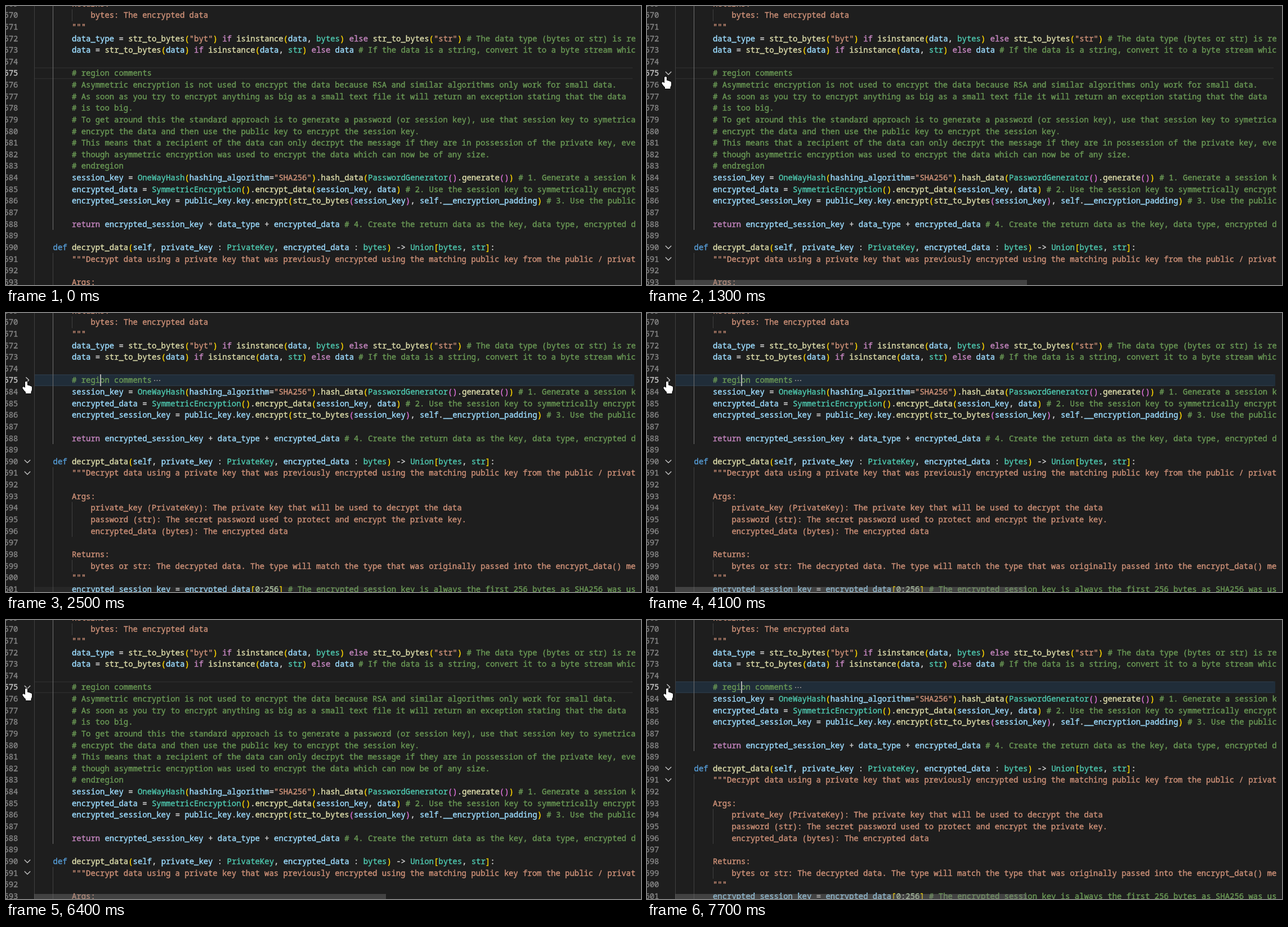
Recreate the animation shown at these times as an HTML page with a canvas. Size 1128 by 496 pixels, loop 8 s.

```html
<!DOCTYPE html>
<html lang="en">
<head>
<meta charset="utf-8">
<title>Folding a region</title>
<style>
html, body { margin: 0; width: 100%; height: 100%; overflow: hidden; background: #1e1e1e; }
canvas { display: block; width: 1128px; height: 496px; }
</style>
</head>
<body>
<canvas id="stage" width="1128" height="496"></canvas>
<script>
const ctx = document.getElementById('stage').getContext('2d');
const W = 1128, H = 496, LOOP = 8000;
const CHAR = 8.35, ROW = 20.63, LEFT = 50.2, MID = 16.2, CLIP = 1118;
const FIRST = 569, FOLD = 575, FOLD_END = 583;
const FONT = '13.917px "Noto Sans Mono", "DejaVu Sans Mono", monospace';
const C = {
  bg: '#1e1e1e', number: '#858585', active: '#c6c6c6', comment: '#6a9955', string: '#ce9178',
  name: '#9cdcfe', call: '#dcdcaa', type: '#4ec9b0', flow: '#c586c0', def: '#569cd6',
  digit: '#b5cea8', plain: '#d4d4d4', guide: '#404040', guideOn: '#707070'
};
const BRACKETS = ['#ffd700', '#da70d6', '#179fff'];

// A leading ~ marks docstring text.
const SOURCE = `~        Returns:
~            bytes: The encrypted data
~        """
        data_type = str_to_bytes("byt") if isinstance(data, bytes) else str_to_bytes("str") # The data type (bytes or str) is re
        data = str_to_bytes(data) if isinstance(data, str) else data # If the data is a string, convert it to a byte stream whic

        # region comments
        # Asymmetric encryption is not used to encrypt the data because RSA and similar algorithms only work for small data.
        # As soon as you try to encrypt anything as big as a small text file it will return an exception stating that the data
        # is too big.
        # To get around this the standard approach is to generate a password (or session key), use that session key to symetrica
        # encrypt the data and then use the public key to encrypt the session key.
        # This means that a recipient of the data can only decrpyt the message if they are in possession of the private key, eve
        # though asymmetric encryption was used to encrypt the data which can now be of any size.
        # endregion
        session_key = OneWayHash(hashing_algorithm="SHA256").hash_data(PasswordGenerator().generate()) # 1. Generate a session k
        encrypted_data = SymmetricEncryption().encrypt_data(session_key, data) # 2. Use the session key to symmetrically encrypt
        encrypted_session_key = public_key.key.encrypt(str_to_bytes(session_key), self.__encryption_padding) # 3. Use the public

        return encrypted_session_key + data_type + encrypted_data # 4. Create the return data as the key, data type, encrypted d

    def decrypt_data(self, private_key : PrivateKey, encrypted_data : bytes) -> Union[bytes, str]:
~        """Decrypt data using a private key that was previously encrypted using the matching public key from the public / privat

~        Args:
~            private_key (PrivateKey): The private key that will be used to decrypt the data
~            password (str): The secret password used to protect and encrypt the private key.
~            encrypted_data (bytes): The encrypted data

~        Returns:
~            bytes or str: The decrypted data. The type will match the type that was originally passed into the encrypt_data() me
~        """
        encrypted_session_key = encrypted_data[0:256] # The encrypted session key is always the first 256 bytes as SHA256 was us`;

function wordColor(word, next) {
  if (/^(if|else|return)$/.test(word)) return C.flow;
  if (word === 'def') return C.def;
  if (/^\d/.test(word)) return C.digit;
  if (/^(bytes|str|[A-Z]\w*)$/.test(word)) return C.type;
  return next === '(' ? C.call : C.name;
}

function tokenize(text) {
  const tokens = [];
  let depth = 0;
  for (const m of text.matchAll(/#.*|"[^"]*"|\w+|[^\s\w]/g)) {
    const s = m[0];
    let color = C.plain;
    if (s[0] === '#') color = C.comment;
    else if (s[0] === '"') color = C.string;
    else if (/\w/.test(s)) color = wordColor(s, text[m.index + s.length]);
    else if ('(['.includes(s)) color = BRACKETS[depth++ % 3];
    else if (')]'.includes(s)) color = BRACKETS[--depth % 3];
    tokens.push({ s, color, col: m.index });
  }
  return tokens;
}

const lines = SOURCE.split('\n').map((raw, i) => {
  const doc = raw[0] === '~';
  const text = doc ? raw.slice(1) : raw;
  const indent = text.search(/\S/);
  const tokens = doc ? [{ s: text.trim(), color: C.string, col: indent }] : tokenize(text);
  return { num: FIRST + i, indent, tokens };
});
lines.forEach((line, i) => {
  if (line.indent < 0) line.indent = Math.min(lines[i - 1].indent, lines[i + 1].indent);
});

// A hairline stroke gives the letters their sturdier weight.
function text(s, x, mid, color) {
  const y = Math.round(mid + 5.1);
  ctx.fillStyle = ctx.strokeStyle = color;
  ctx.lineWidth = .4;
  ctx.fillText(s, x, y);
  ctx.strokeText(s, x, y);
}

function rect(x, y, w, h, color) {
  ctx.fillStyle = color;
  ctx.fillRect(x, y, w, h);
}

function chevron(y, folded) {
  ctx.save();
  ctx.translate(38, y);
  if (folded) ctx.rotate(-Math.PI / 2);
  ctx.strokeStyle = '#c5c5c5';
  ctx.lineWidth = 1.4;
  ctx.beginPath();
  ctx.moveTo(-5.2, -2.6);
  ctx.lineTo(0, 2.6);
  ctx.lineTo(5.2, -2.6);
  ctx.stroke();
  ctx.restore();
}

const HAND = new Path2D('M5 2.2Q5 .4 7 .4T9 2.2V7.6Q10.8 6.8 11.6 8.2Q13.2 7.4 14.2 9Q16.6 8.6 17 11V15' +
  'Q17 17 15.4 19.2V22H6V19.4Q3 17 .6 13Q-.2 11 1.2 10.4Q3 9.8 5 12Z');

function hand(dx, dy) {
  ctx.save();
  ctx.translate(29 + dx, 121 + dy);
  ctx.lineWidth = 1.6;
  ctx.strokeStyle = '#000';
  ctx.stroke(HAND);
  ctx.fillStyle = '#fff';
  ctx.fill(HAND);
  ctx.restore();
}

function beam(u) {
  const curve = (a, b, c) => Math.round(a * (1 - u) ** 2 + 2 * b * u * (1 - u) + c * u * u);
  const x = curve(440, 150, 56), y = curve(476, -32, 132);
  rect(x, y - 8, 1, 16, '#ddd');
  rect(x - 3, y - 9, 7, 1, '#ddd');
  rect(x - 3, y + 8, 7, 1, '#ddd');
}

// [time, dx, dy] of the hand, relative to where it rests
const HAND_STEPS = [[1000, 14, 8], [1100, 5, 7], [1200, -4, 6], [1300, -3, 4],
  [1400, 1, 2], [1500, 6, 0], [1800, 3, 0], [1900, 0, 0]];
// Caret on at each even entry, off at each odd one
const BLINKS = [2300, 2800, 3200, 3700, 4100, 4600, 5000, 5500, 5900, 6400, 6800, 7300, 7700];
// [time, opacity] of the scrollbar
const BAR = [[0, 0], [100, .5], [200, 1], [2500, .25], [2600, 1], [4600, 0], [4700, 1],
  [6700, 0], [6800, .5], [6900, 1]];

const latest = (steps, t) => steps.filter(s => s[0] <= t).pop();

function drawLine(line, row, folded, hover) {
  const mid = MID + row * ROW, top = mid - ROW / 2;
  const current = line.num === FOLD;
  if (current) {
    rect(51, 109, 1062, 2, '#282828');
    rect(51, 128, 1062, 2, '#282828');
    if (folded) rect(50, 109, 1066, 21, 'rgba(38,79,120,.3)');
  }
  for (let col = 0; col < line.indent; col += 4) {
    const on = col === 4 && line.num < 589;
    rect(Math.floor(LEFT + col * CHAR), Math.round(top), 1,
      Math.round(top + ROW) - Math.round(top), on ? C.guideOn : C.guide);
  }
  text(String(line.num), -3.6, mid, current ? C.active : C.number);
  for (const k of line.tokens) text(k.s, LEFT + k.col * CHAR, mid, k.color);
  if (current && folded) {
    for (let i = 0; i < 3; i++) rect(263 + i * 4.5, 119, 2, 2, '#808080');
  }
  if (hover && (current || line.num === 590 || line.num === 591)) chevron(mid, current && folded);
}

function draw(ms) {
  const t = Math.floor(ms / 100) * 100;
  const folded = (t >= 2500 && t < 4600) || t >= 6700;
  const hover = t >= 1000;
  rect(0, 0, W, H, C.bg);
  ctx.font = FONT;
  ctx.lineJoin = 'round';
  ctx.save();
  ctx.beginPath();
  ctx.rect(0, 0, CLIP, H);
  ctx.clip();
  let row = -1;
  for (const line of lines) {
    if (folded && line.num > FOLD && line.num <= FOLD_END) continue;
    drawLine(line, row++, folded, hover);
    if (MID + row * ROW > H + ROW) break;
  }
  if (BLINKS.filter(b => b <= t).length % 2) rect(167, 109, 2, 21, '#aeafad');
  rect(50, 487, 625, 9, `rgba(121,121,121,${.4 * latest(BAR, t)[1]})`);
  ctx.restore();
  if (hover) {
    const [, dx, dy] = latest(HAND_STEPS, t);
    hand(dx, dy);
  } else if (t >= 100) beam((t - 100) / 800);
}

const start = performance.now();
function tick() {
  draw((performance.now() - start) % LOOP);
  requestAnimationFrame(tick);
}
tick();
</script>
</body>
</html>
```
